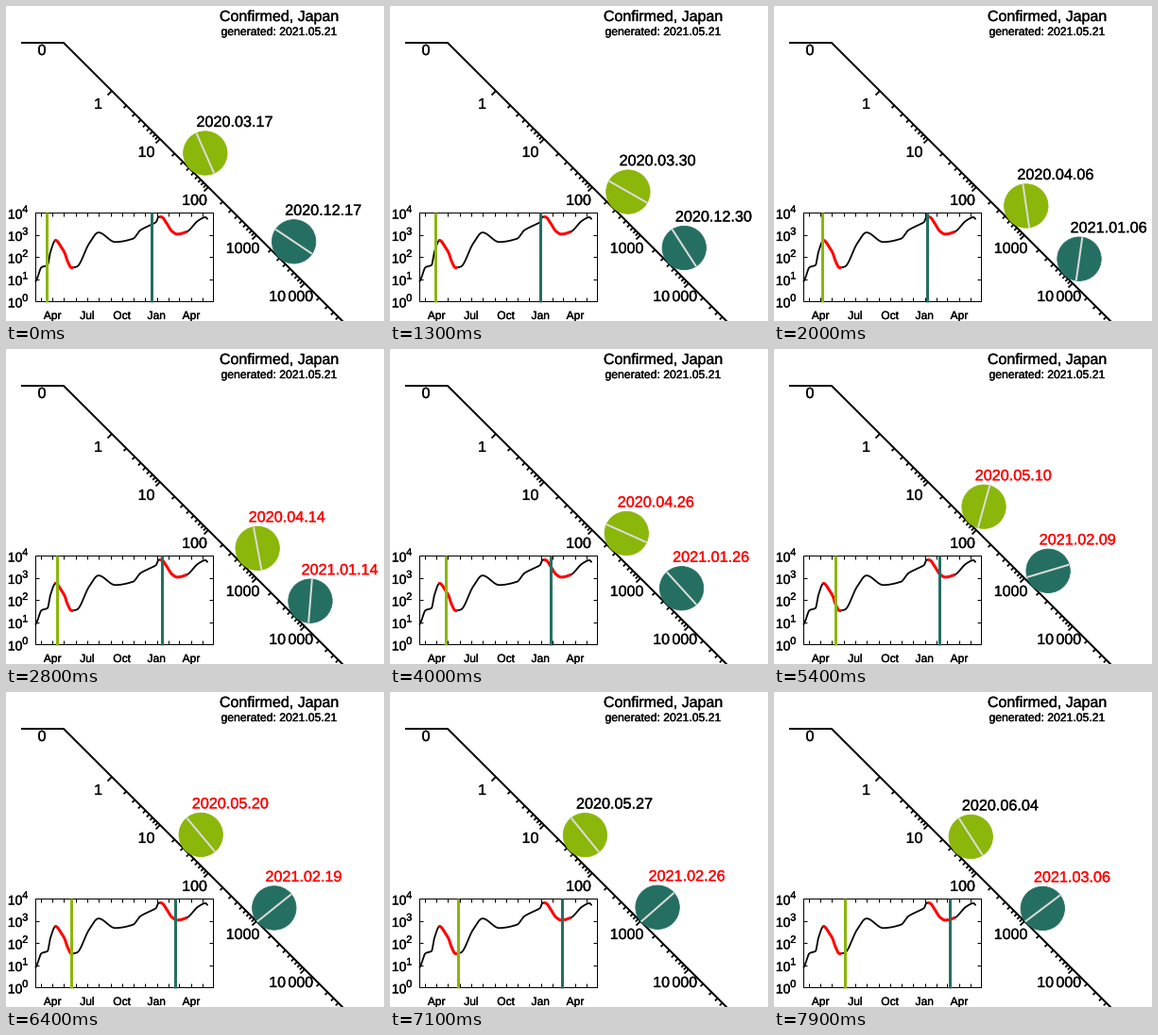
Animation of 400x334 px, one loop 8000 ms. Source, as a matplotlib script:

```python
import numpy as np
import matplotlib.pyplot as plt
from matplotlib.animation import FuncAnimation
from matplotlib.patches import Circle, Rectangle
from matplotlib.patheffects import withStroke

W, H, DPI = 400, 334, 100
FRAMES = 80
PX = 72 / DPI
GREEN, TEAL, STRIPE = "#8bb60a", "#256f62", "#dcdcd8"
START = np.datetime64("2020-03-17")
LAG = 275
EMERGENCIES = [(21, 69), (297, 369)]
RADIUS = 23.2
DECADE = 51
LEFT, RIGHT, TOP, BOTTOM = 31, 219, 219, 313

# Bends of the case curve: day since START, log10 of daily cases
BENDS = np.array([
    (-31, .88), (-14, 1.53), (2, 1.63), (9, 2.2), (23, 2.745), (40, 2.384),
    (47, 2.18), (54, 1.83), (65, 1.515), (79, 1.56), (111, 2.59), (136, 3.1),
    (180, 2.67), (227, 2.82), (246, 3.2), (275, 3.449), (288, 3.58),
    (294, 3.81), (303, 3.79), (315, 3.527), (329, 3.165), (343, 3.025),
    (369, 3.14), (398, 3.63), (418, 3.79), (424, 3.7)])


def log_cases(t):
    """Monotone cubic through the bends."""
    x, y = BENDS.T
    h = np.diff(x)
    s = np.diff(y) / h
    m = np.zeros_like(x)
    same = s[:-1] * s[1:] > 0
    a, b = s[:-1][same], s[1:][same]
    m[1:-1][same] = 2 * a * b / (a + b)
    i = np.clip(np.searchsorted(x, t, side="right") - 1, 0, len(h) - 1)
    u = (t - x[i]) / h[i]
    return (y[i] * (1 + 2 * u) * (1 - u) ** 2 + y[i + 1] * u * u * (3 - 2 * u)
            + h[i] * (m[i] * u * (1 - u) ** 2 + m[i + 1] * u * u * (u - 1)))


plt.rcParams["font.family"] = "Liberation Sans"
fig = plt.figure(figsize=(W / DPI, H / DPI), dpi=DPI, facecolor="white")
ax = fig.add_axes([0, 0, 1, 1])
ax.set(xlim=(0, W), ylim=(H, 0))
ax.axis("off")


def text(x, y, s, size=16, ha="center", **kw):
    return ax.text(x, y, s, fontsize=size * PX, ha=ha, va="baseline",
                   path_effects=[withStroke(linewidth=0.3 * PX)], **kw)


def line(x, y, width, color="black", **kw):
    kw.setdefault("solid_capstyle", "butt")
    return ax.plot(x, y, color=color, lw=width * PX, **kw)[0]


def slope_x(log):
    return 61 + DECADE * (log + 1)


def plot_x(day):
    return 43.2 + 0.402 * day


def plot_y(log):
    return BOTTOM - (BOTTOM - TOP) / 4 * log


def draw_slope():
    line([16, 61, 361], [39, 39, 339], 2, solid_joinstyle="miter")
    for d in range(5):
        for k in range(1, 10):
            x, n = slope_x(d + np.log10(k)), 4.5 if k == 1 else 2.8
            line([x, x - n], [x - 22, x - 22 + n], 1.8)
    text(38, 52, "0")
    for d in range(4):
        text(97.5 + DECADE * d, 109 + DECADE * d, str(10 ** d))
    text(296, 313, "10", ha="right")
    text(298.4, 313, "000", ha="left")


def draw_inset():
    ax.add_patch(Rectangle((LEFT, TOP), RIGHT - LEFT, BOTTOM - TOP,
                           fc="white", ec="black", lw=PX, zorder=3))
    for month in np.arange("2020-03", "2021-06", dtype="datetime64[M]"):
        x = plot_x((month.astype("datetime64[D]") - START).astype(int))
        for y, n in ((TOP, 4), (BOTTOM, -4)):
            line([x, x], [y, y + n], 1, zorder=3)
    for i, name in enumerate(["Apr", "Jul", "Oct", "Jan", "Apr"]):
        text(49.2 + 36.7 * i, 332, name, 12)
    for p in range(5):
        y = plot_y(p)
        for x, n in ((LEFT, 4), (RIGHT, -4)):
            line([x, x + n], [y, y], 1, zorder=3)
        text(17.3, y + 6.5, "10", 14, ha="right")
        text(17.2, y, str(p), 11, ha="left")
    days = np.arange(BENDS[0, 0], BENDS[-1, 0] + 1)
    line(plot_x(days), plot_y(log_cases(days)), 1.8, zorder=4)
    for first, last in EMERGENCIES:
        days = np.arange(first, last + 1)
        line(plot_x(days), plot_y(log_cases(days)), 3, "red", zorder=5)


class Ball:
    def __init__(self, lag, color):
        self.lag = lag
        self.disc = ax.add_patch(Circle((0, 0), RADIUS, fc=color, ec=color,
                                        lw=0.8 * PX, zorder=6))
        self.stripe = line([], [], 2, STRIPE, zorder=7)
        self.bar = line([], [], 3, color, zorder=8)
        self.label = text(0, 0, "", 16.2, zorder=9)

    def move(self, frame):
        day = frame + self.lag
        x = slope_x(log_cases(day))
        lift = RADIUS / np.sqrt(2)
        cx, cy = x + lift + 0.3, x - 22 - lift + 0.3
        turn = np.radians(67.3) + (x - 194.4) * np.sqrt(2) / RADIUS
        dx, dy = RADIUS * np.cos(turn), RADIUS * np.sin(turn)
        self.disc.center = cx, cy
        self.stripe.set_data([cx - dx, cx + dx], [cy - dy, cy + dy])
        self.bar.set_data([plot_x(day)] * 2, [TOP, BOTTOM + 1])
        self.label.set_position((cx + 31.3, cy - 28))
        self.label.set_text(str(START + day).replace("-", "."))
        alert = any(a <= day <= b for a, b in EMERGENCIES)
        self.label.set_color("red" if alert else "black")
        return self.disc, self.stripe, self.bar, self.label


text(289, 16, "Confirmed, Japan")
text(289, 31, "generated: 2021.05.21", 12.2)
draw_slope()
draw_inset()
balls = [Ball(0, GREEN), Ball(LAG, TEAL)]


def update(frame):
    return [part for ball in balls for part in ball.move(frame)]


anim = FuncAnimation(fig, update, frames=FRAMES, interval=1000 / 10,
                     repeat=True, repeat_delay=0, blit=False)
plt.show()
```
